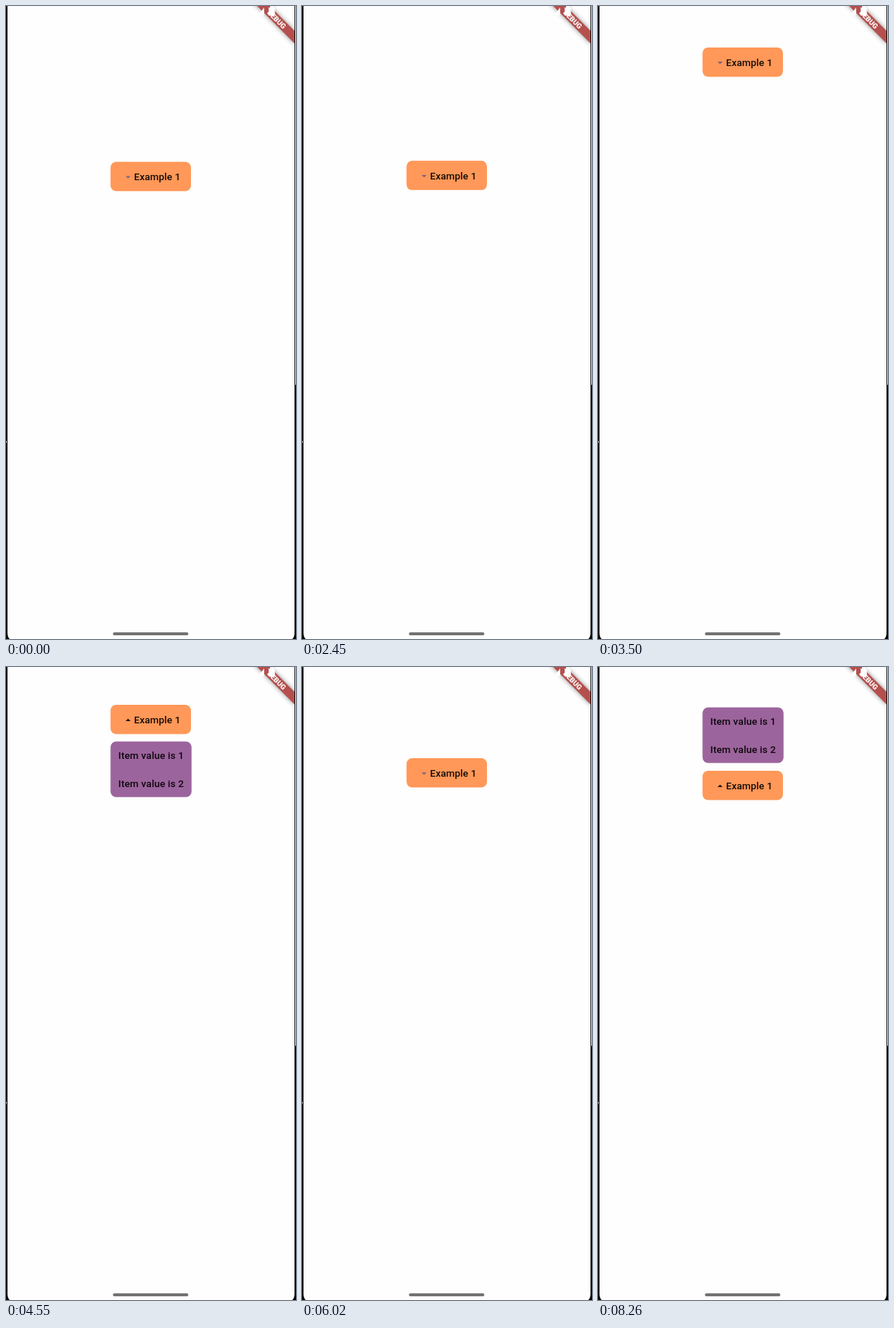
These frames come from a looping animation (392x854 px, 8.33 s). An HTML page:

```html
<!DOCTYPE html>
<html lang="en">
<head>
<meta charset="utf-8">
<title>Dropdown</title>
<style>
  html, body { margin: 0; width: 100%; height: 100%; overflow: hidden; background: #000; }
  svg { display: block; width: 392px; height: 854px; }
  text { font: 500 13.35px Roboto, sans-serif; letter-spacing: .095px; fill: #140d0a; }
  .item { letter-spacing: .15px; text-anchor: middle; fill: #0d070d; }
  .banner { filter: drop-shadow(0 0 3px rgba(0, 0, 0, .45)); }
  .debug { font-weight: 900; font-size: 9.7px; letter-spacing: 0; text-anchor: middle; fill: #fff; }
</style>
</head>
<body>
<svg viewBox="0 0 392 854">
  <defs>
    <clipPath id="screen"><path d="M2 0H390V846Q390 851 387 854H5Q2 851 2 846Z"/></clipPath>
  </defs>
  <rect width="392" height="854"/>
  <rect x="391" width="1" height="511" fill="#fefefe"/>
  <rect y="587" width="1" height="2" fill="#ddd"/>

  <g clip-path="url(#screen)">
    <rect width="392" height="854" fill="#fefefe"/>
    <g transform="translate(366 18) rotate(45)">
      <rect class="banner" x="-40" y="-6" width="80" height="12" fill="#b4504d"/>
      <text class="debug" y="3.5">DEBUG</text>
    </g>
    <path d="M340.500 12.500L349 2V12.500ZM355 2H357V0H361V2H363.500V13H355Z" fill="#fefefe"/>
    <rect x="144.500" y="845" width="102" height="4" rx="2" fill="#727272"/>

    <g id="button">
      <rect x="141.300" width="108.700" height="39.500" rx="7.600" fill="#ff9858"/>
      <rect id="ink" x="141.300" width="108.700" height="39.500" rx="7.600" fill="#67509c" opacity="0"/>
      <path id="down" d="M161.700 19.200H168.300L165 22.500Z" fill="#80627f"/>
      <path id="up" d="M161.700 22H168.300L165 18.700Z" fill="#140d0a"/>
      <text x="173" y="24.700">Example 1</text>
    </g>
    <g id="menu">
      <rect x="141.300" width="109.500" height="75" rx="7.600" fill="#9c649c"/>
      <text class="item" x="196.200" y="23.700">Item value is 1</text>
      <text class="item" x="196.200" y="61.300">Item value is 2</text>
    </g>
  </g>
</svg>
<script>
  const LOOP = 8330, STEP = 70;
  const part = id => document.getElementById(id);
  const [button, ink, down, up, menu] = ['button', 'ink', 'down', 'up', 'menu'].map(part);

  // power below 1 makes the drag start faster and settle slower
  const drags = [
    { start: 2410, end: 2590, from: 210.3, to: 199, power: 1 },
    { start: 2800, end: 3570, from: 199, to: 54, power: .73 },
    { start: 3779, end: 3780, from: 54, to: 51, power: 1 },
    { start: 5660, end: 6160, from: 51, to: 140, power: 1 }
  ];
  const openings = [
    { start: 1260, end: 1960, offset: -85.5 },
    { start: 4550, end: 5670, offset: 49.5 },
    { start: 7000, end: LOOP, offset: -85.5 }
  ];

  const clamp = u => Math.min(1, Math.max(0, u));
  const smooth = u => u * u * (3 - 2 * u);

  function buttonTop(t) {
    let y = drags[0].from;
    for (const d of drags) {
      if (t < d.start) break;
      const u = clamp((t - d.start) / (d.end - d.start)) ** d.power;
      y = d.from + (d.to - d.from) * smooth(u);
    }
    return y;
  }

  function show(node, visible) {
    node.setAttribute('visibility', visible ? 'visible' : 'hidden');
  }

  function draw(t) {
    const y = buttonTop(t);
    const open = openings.find(o => t >= o.start && t < o.end);
    button.setAttribute('transform', `translate(0 ${y})`);
    show(down, !open);
    show(up, open);
    show(menu, open);
    if (open) menu.setAttribute('transform', `translate(0 ${y + open.offset})`);
    const press = open ? clamp((t - open.start) / 600) : 0;
    ink.setAttribute('opacity', .05 * Math.sin(Math.PI * press));
  }

  const began = performance.now();
  function tick() {
    const t = (performance.now() - began) % LOOP;
    draw(Math.floor(t / STEP) * STEP);
    requestAnimationFrame(tick);
  }
  tick();
</script>
</body>
</html>
```
